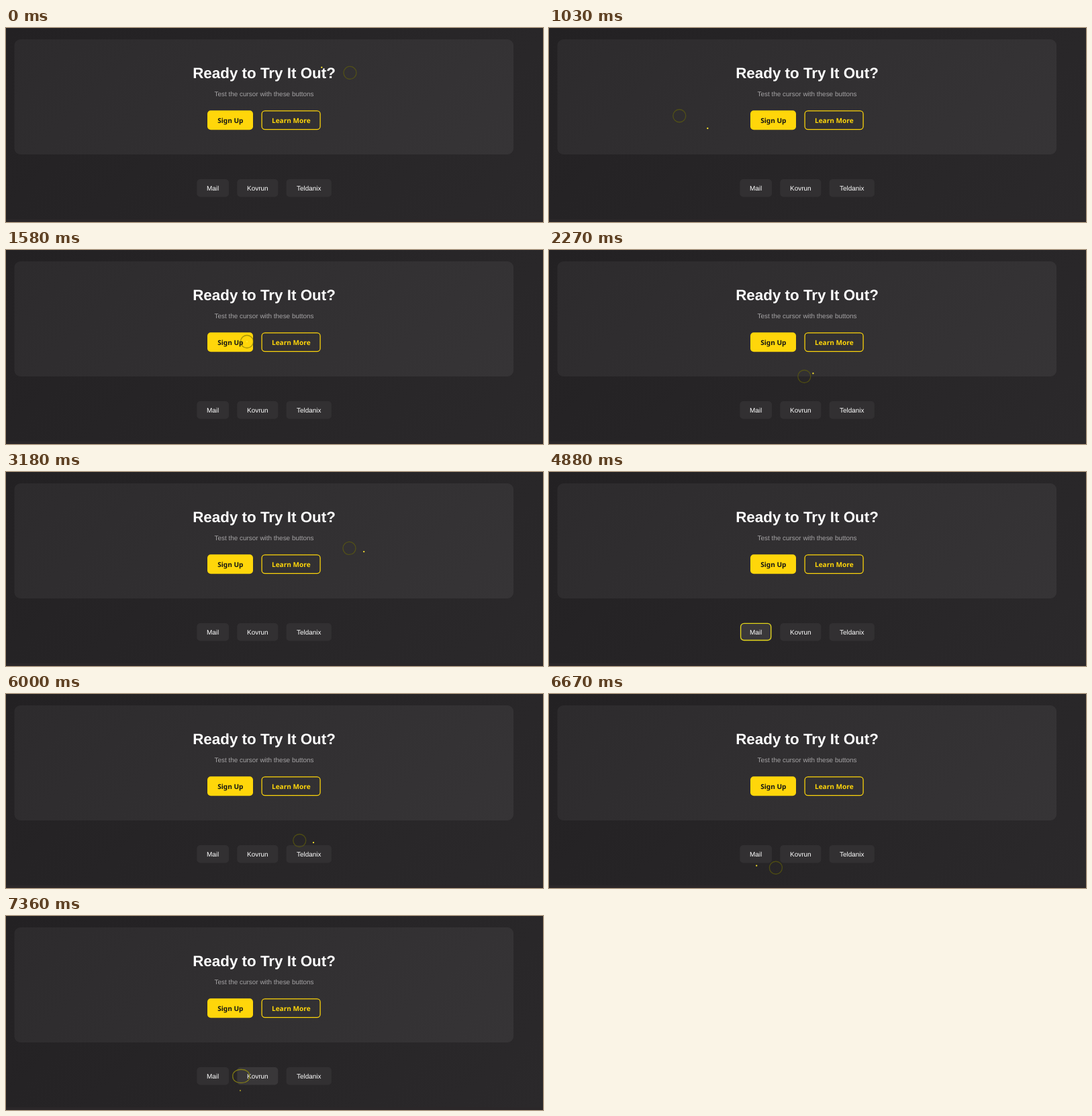
Write an HTML page that moves like this. It is 800 px wide and 290 px high and loops after 7.39 s.

```html
<!DOCTYPE html>
<html lang="en">
<head>
<meta charset="utf-8">
<title>Cursor demo</title>
<style>
  html, body { margin: 0; width: 100%; height: 100%; overflow: hidden; background: #262426; }
  svg { display: block; width: 800px; height: 290px; }
  text {
    font: 9.95px "Liberation Sans", Arial, sans-serif; fill: #fff;
    text-anchor: middle; text-rendering: geometricPrecision;
  }
  .title { font-size: 22.4px; font-weight: 700; }
  .sub { fill: #a5a3a5; }
  .button { font: 700 10.1px "Noto Sans", "Open Sans", sans-serif; }
</style>
</head>
<body>
<svg viewBox="0 0 800 290">
  <defs>
    <linearGradient id="page" gradientUnits="userSpaceOnUse" x1="128" y1="-127" x2="672" y2="417">
      <stop stop-color="#232123"/><stop offset="1" stop-color="#2b292b"/>
    </linearGradient>
    <linearGradient id="panel" gradientUnits="userSpaceOnUse" x1="155" y1="-126" x2="613" y2="332">
      <stop stop-color="#2d2b2d"/><stop offset="1" stop-color="#363436"/>
    </linearGradient>
  </defs>
  <rect width="800" height="290" fill="url(#page)"/>
  <rect y="286" width="800" height="4" fill="#2b2729"/>
  <rect x="12.5" y="17" width="743.5" height="172" rx="9" fill="url(#panel)"/>
  <text class="title" x="384.5" y="75">Ready to Try It Out?</text>
  <text class="sub" x="384.5" y="102.2">Test the cursor with these buttons</text>
  <rect x="300" y="123.2" width="68" height="29" rx="5" fill="#ffd60a"/>
  <text class="button" x="334.3" y="141.6" style="fill:#141414">Sign Up</text>
  <rect x="381.1" y="123.8" width="87" height="27.8" rx="4.7" fill="none" stroke="#ffd60a" stroke-width="1.25"/>
  <text class="button" x="424.8" y="141.6" style="fill:#ffd60a">Learn More</text>
  <g id="chips"></g>
  <rect id="ring" fill="none" stroke-width="1.3"/>
  <circle id="dot" r="1.15" fill="#ffe92e"/>
</svg>
<script>
const LOOP = 7390, LAG = 80, SIZE = 19;
const TOP = 226, HEIGHT = 26.5, GAP = 12.3;

// Turning points of the pointer: time, x, y
const turns = [
  [-80, 513, 67], [0, 471, 59], [330, 230, 9], [680, 144, 59], [950, 194, 131], [1030, 236, 150],
  [1490, 359, 137], [1780, 359, 137], [1960, 291, 190], [2190, 380, 189], [2270, 393, 185],
  [2400, 476, 69], [2720, 325, 135], [3100, 511, 114], [3180, 533, 119], [3260, 541, 130],
  [3780, 330, 221], [4100, 256, 204], [4450, 308, 239], [4840, 308, 239], [5180, 398, 157],
  [5560, 335, 222], [5920, 437, 219], [6000, 458, 222], [6330, 445, 242], [6740, 297, 245],
  [7030, 399, 73], [7280, 346, 239], [7360, 349, 261]
];

// Link chips and the time span in which the ring snaps to each
const chips = [
  { label: "Mail", w: 47.7, from: 4300, to: 5040 },
  { label: "Kovrun", w: 61, from: 7330, to: 9000 },
  { label: "Teldanix", w: 67.3, from: 6150, to: 6480 }
];

const clamp = v => Math.max(0, Math.min(1, v));
const mix = (a, b, k) => a + (b - a) * k;
const set = (el, attrs) => { for (const k in attrs) el.setAttribute(k, attrs[k]); };
const add = (tag, attrs) => {
  const el = document.createElementNS("http://www.w3.org/2000/svg", tag);
  set(el, attrs);
  return document.getElementById("chips").appendChild(el);
};

let left = 284.3;
for (const c of chips) {
  const box = { x: left, y: TOP, width: c.w, height: HEIGHT, rx: 5 };
  c.mid = left + c.w / 2;
  add("rect", { ...box, fill: "#323032" });
  c.glow = add("rect", { ...box, fill: "#fff" });
  add("text", { x: c.mid, y: 242.8 }).textContent = c.label;
  left += c.w + GAP;
}

// Speed along one axis at a turning point, zero at either end of a rest
function slope(i, axis) {
  const p = turns[i], a = turns[i - 1] || p, b = turns[i + 1] || p;
  const still = q => q !== p && q[1] === p[1] && q[2] === p[2];
  return still(a) || still(b) ? 0 : (b[axis] - a[axis]) / (b[0] - a[0]);
}

// Smooth cubic curve through the turning points
function pointer(t) {
  const next = turns.findIndex(p => p[0] > t);
  if (next < 0) return turns[turns.length - 1].slice(1);
  const i = next - 1, a = turns[i], b = turns[next];
  const d = b[0] - a[0], u = (t - a[0]) / d, v = 1 - u;
  return [1, 2].map(k =>
    v * v * (1 + 2 * u) * a[k] + u * u * (3 - 2 * u) * b[k] +
    d * u * v * (v * slope(i, k) - u * slope(next, k)));
}

function draw(t) {
  const [dx, dy] = pointer(t);
  let [cx, cy] = pointer(t - LAG), w = SIZE, h = SIZE, snap = 0;
  for (const c of chips) {
    const s = clamp(Math.min((t - c.from) / 200, (c.to - t) / 150));
    c.glow.setAttribute("opacity", 0.04 * clamp(s * 6));
    snap = Math.max(snap, s);
    cx = mix(cx, c.mid, s);
    cy = mix(cy, TOP + HEIGHT / 2 - 0.3, s);
    w = mix(w, c.w - 2.6, s);
    h = mix(h, HEIGHT - 1.4, s);
  }
  const k = Math.sqrt(snap);
  set(ring, {
    x: cx - w / 2, y: cy - h / 2, width: w, height: h,
    rx: mix(w / 2, 5, snap), ry: mix(h / 2, 5, snap),
    stroke: `rgba(${mix(104, 228, k)},${mix(102, 214, k)},${mix(6, 24, k)},${mix(0.6, 1, k)})`
  });
  set(dot, { cx: dx, cy: dy, opacity: clamp(1 - 3.3 * snap) });
}

const ring = document.getElementById("ring"), dot = document.getElementById("dot");
const start = performance.now();
(function frame() {
  draw((performance.now() - start) % LOOP);
  requestAnimationFrame(frame);
})();
</script>
</body>
</html>
```
